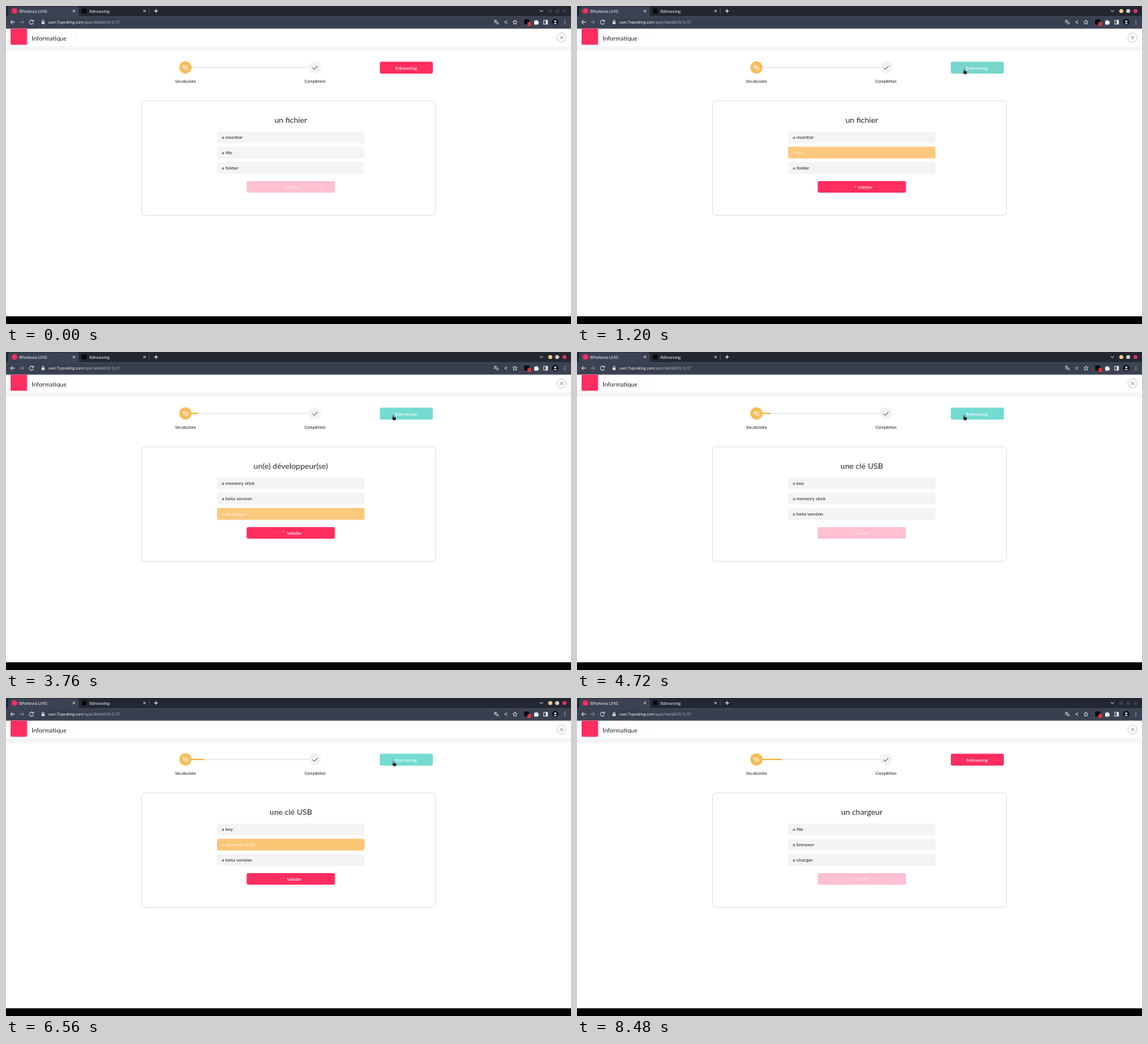
Write an HTML page that moves like this. It is 736 by 414 pixels and loops after 9520 ms.

```html
<!DOCTYPE html>
<html lang="fr">
<head>
<meta charset="utf-8">
<title>Informatique</title>
<style>
  :root { --loop: 9520ms; --pink: #ff2d60; --teal: #74dbd0; --amber: #fbc676; --grey: #f4f4f6; }
  html, body { margin: 0; width: 100%; height: 100%; overflow: hidden; background: #fff; }
  svg { display: block; }
  text { font-family: Lato, sans-serif; font-size: 6.5px; fill: #25252d; }
  .mid { text-anchor: middle; }
  .white { fill: #fff; }
  .ui text { font-size: 5.8px; fill: #e6e9ef; }
  .ui .url { font-size: 5.3px; }
  .line { fill: none; stroke: #dfe3ea; stroke-width: 1; }
  .title { font-size: 10.4px; }
  .step { font-size: 5.4px; }

  /* Window focus, pointer and hover button */
  .dots, .arrow, .hand, .cards { animation: var(--loop) step-end infinite; }
  .dots { animation-name: focus; }
  .arrow { animation-name: arrow; }
  .hand { animation-name: hand; }
  .cards { animation-name: cards; }
  .cursor { animation: move var(--loop) ease-in-out infinite; }
  .hover { fill: var(--pink); animation: hover var(--loop) cubic-bezier(.4, 0, .2, 1) infinite; }
  .bar { fill: #f6bd5b; animation: grow var(--loop) linear infinite; }

  @keyframes focus { 0% { opacity: 0 } 1.7% { opacity: 1 } 87.4%, to { opacity: 0 } }
  @keyframes arrow { 0% { opacity: 1 } 9.4% { opacity: 0 } 81.2%, to { opacity: 1 } }
  @keyframes hand { 0% { opacity: 0 } 9.4% { opacity: 1 } 81.2%, to { opacity: 0 } }
  @keyframes move {
    0%, .6% { transform: translate(742px, 163px); animation-timing-function: ease-in; }
    10.5%, 68.3% { transform: translate(505px, 85px); }
    74.6%, 79% { transform: translate(528px, 85px); }
    88.2%, to { transform: translate(742px, 165px); }
  }
  @keyframes hover {
    0%, 10.6% { fill: var(--pink) }
    13.2%, 81.2% { fill: var(--teal) }
    83.8%, to { fill: var(--pink) }
  }
  @keyframes grow {
    0%, 22.4% { width: 0 }
    23.4%, 49.3% { width: 8.4px }
    50.3%, 76.8% { width: 16.8px }
    77.8%, to { width: 25.2px }
  }
  @keyframes cards {
    0% { transform: none }
    22.48% { transform: translateY(-120px) }
    49.37% { transform: translateY(-240px) }
    76.89%, to { transform: translateY(-360px) }
  }

  /* Answer cycle: every animation below begins at the card's click */
  .play * { animation: var(--loop) step-end var(--at) infinite; }
  .play .box { animation-name: pick; animation-timing-function: cubic-bezier(.4, 0, .2, 1); }
  .play .word { animation-name: word; }
  .play .send { animation-name: send; }
  .play .idle { animation-name: idle; }
  .busy, .done { opacity: 0; }
  .play .busy { animation-name: busy; }
  .play .done { animation-name: done; }
  .spin { fill: none; stroke: #fff; stroke-width: .7; stroke-dasharray: 2 14; }
  .play .spin { animation: spin 1400ms linear infinite; transform-origin: 361px 106px; }
  .box { fill: var(--grey); }
  .send { fill: #ffc0cf; }
  .idle { fill: #ffe8ee; }

  @keyframes pick {
    0% { fill: var(--grey) }
    2.63%, 4.2% { fill: var(--amber) }
    6.83%, 11.9% { fill: var(--teal) }
    12%, to { fill: var(--grey) }
  }
  @keyframes word { 0% { fill: #fff6e4 } 12%, to { fill: #25252d } }
  @keyframes send { 0% { fill: var(--pink) } 12%, to { fill: #ffc0cf } }
  @keyframes idle { 0% { opacity: 0 } 12%, to { opacity: 1 } }
  @keyframes busy { 0% { opacity: 1 } 4.2%, to { opacity: 0 } }
  @keyframes done { 0% { opacity: 0 } 4.2% { opacity: 1 } 12%, to { opacity: 0 } }
  @keyframes spin { to { transform: rotate(360deg) } }
</style>
</head>
<body>
<svg width="736" height="414" viewBox="0 0 736 414">
  <rect width="736" height="414" fill="#fff"/>

  <g class="ui">
    <rect width="736" height="14" fill="#222731"/>
    <path d="M0 13.5Q3 13 3 10V3Q3 .5 6 .5H92Q95 .5 95 3V13.5Z" fill="#3b4252"/>
    <rect y="13" width="736" height="16.5" fill="#3b4252"/>
    <rect x="43" y="16" width="627" height="10.5" rx="5" fill="#373e4c"/>
    <circle cx="11" cy="6.5" r="3.5" fill="#ff2d60"/>
    <text x="17" y="8.6">8Parlovia LMS</text>
    <rect x="99" y="3.5" width="6" height="6" fill="#07090c"/>
    <text x="108.5" y="8.6">8drowsing</text>
    <path class="line" d="M87 5l3 3m0-3l-3 3M179 5l3 3m0-3l-3 3M193 6.5h5m-2.500-2.500v5M695.500 5.500l2 2 2-2"/>
    <path d="M186.500 3v7" stroke="#586070" stroke-width=".7"/>
    <g fill="#363c48"><circle cx="709" cy="6.500" r="2.600"/><circle cx="718" cy="6.500" r="2.600"/><circle cx="727.500" cy="6.500" r="2.600"/></g>
    <g class="dots"><circle cx="709" cy="6.500" r="2.600" fill="#f6d08c"/><circle cx="718" cy="6.500" r="2.600" fill="#d5cdd0"/><circle cx="727.500" cy="6.500" r="2.600" fill="#d8365f"/></g>

    <path class="line" d="M11.500 21H6m2.500-2.500L6 21l2.500 2.500M35.200 19.300A2.700 2.700 0 1 0 35.700 22M35.800 18v2h-2"/>
    <path class="line" d="M17.500 21H23m-2.500-2.500L23 21l-2.500 2.500" opacity=".4"/>
    <path d="M46.300 20.500h4v3h-4z" fill="#dfe3ea"/>
    <path class="line" d="M47.200 20.500v-1a1.100 1.100 0 0 1 2.200 0v1" stroke-width=".6"/>
    <text class="url" x="55" y="23">user.7speaking.com<tspan fill="#aeb5c2">/quiz/kdsi60/0/1/1?</tspan></text>
    <g class="line" style="stroke-width:.8">
      <path d="M635.500 19h4m-2-1v1m1.300 0q-.8 2-3 3m.8-2l2 2m.2 2l1.500-3.500 1.500 3.500"/>
      <path d="M653 19l-3.500 2 3.500 2"/>
      <path d="M663 18.200l.9 1.900 2 .2-1.500 1.400.4 2-1.800-1-1.800 1 .4-2-1.500-1.400 2-.2z"/>
      <rect x="700.500" y="18.700" width="5" height="5"/>
    </g>
    <path d="M703 18.700h2.500v5H703z" fill="#dfe3ea"/>
    <rect x="675" y="17.500" width="6.500" height="6.500" fill="#0a0b0e"/>
    <rect x="679.300" y="21" width="4.700" height="5" rx="1" fill="#e0343d"/>
    <path d="M688 19.200h1.700a1 1 0 0 1 2 0h1.600v1.600a1 1 0 0 1 0 2v1.400H688z" fill="#eef0f4"/>
    <circle cx="715.500" cy="21" r="4.300" fill="#11151c"/>
    <circle cx="715.500" cy="20" r="1.300" fill="#eef0f4"/>
    <path d="M712.900 23.600q2.600-3 5.200 0z" fill="#eef0f4"/>
    <path d="M727.500 18.300h1v1h-1zm0 2.200h1v1h-1zm0 2.200h1v1h-1z" fill="#dfe3ea"/>
  </g>

  <rect x="6" y="29.500" width="21.500" height="21" rx="1" fill="#ff2d60"/>
  <text x="33.500" y="44.600" style="font-size:8px">Informatique</text>
  <path d="M92.500 37v9" stroke="#ececef" stroke-width=".6"/>
  <circle cx="723.700" cy="41" r="6" fill="#fff" stroke="#bdbdc3" stroke-width=".7"/>
  <path d="M721.500 38.800l4.400 4.400m0-4.400l-4.400 4.400" stroke="#777780" stroke-width=".8"/>
  <rect y="52.500" width="736" height="6" fill="#f5f5f7"/>

  <rect x="241" y="79" width="154" height="2" fill="#efeff1"/>
  <rect class="bar" x="241.500" y="79" height="2"/>
  <circle cx="233.800" cy="80" r="8" fill="#f6bd5b"/>
  <path d="M230.500 77.700h2.700v2h-2.700zM234 78.500h3M231 81.200h2m.8-1h3v2.500h-3z" fill="none" stroke="#fff" stroke-width=".7"/>
  <circle cx="402.500" cy="80" r="8" fill="#f2f2f4"/>
  <path d="M399.300 80.300l2.200 2.200 4.300-4.500" fill="none" stroke="#3a3a42" stroke-width=".9"/>
  <text class="mid step" x="233.800" y="100.200">Vocabulaire</text>
  <text class="mid step" x="402.500" y="100.200">Complétion</text>
  <rect class="hover" x="487" y="72.500" width="69" height="15.500" rx="2"/>
  <text class="mid white" x="521" y="82.500" style="font-size:6.200px">8drowsing</text>

  <rect x="176.500" y="123.500" width="383" height="149" rx="4" fill="#fff" stroke="#dfdfe3" stroke-width=".8"/>
  <svg y="130" width="736" height="120"><g class="cards" id="cards"></g></svg>

  <rect y="404" width="736" height="10" fill="#000"/>

  <g class="cursor">
    <path class="arrow" d="M0-3v7.500l1.800-1.600 1.200 2.600 1.200-.6L3 2.400h2.400z" fill="#000" stroke="#fff" stroke-width=".4"/>
    <path class="hand" d="M-1.200-2.500q.7-.8 1.300 0V-.5l2.200.5q1 .3.800 1.400L2.500 3.800h-3.300L-2.400 1.200q-.2-1 1.200-.3z" fill="#000" stroke="#fff" stroke-width=".3"/>
  </g>
</svg>
<script>
  // [title, answers, index of the right one, click time in ms]
  const quiz = [
    ["un fichier", ["a monitor", "a file", "a folder"], 1, 1020],
    ["un(e) développeur(se)", ["a memory stick", "a beta version", "a developer"], 2, 3580],
    ["une clé USB", ["a key", "a memory stick", "a beta version"], 1, 6200],
    ["un chargeur", ["a file", "a browser", "a charger"]]
  ];

  const option = (label, i, right) => {
    const y = 33.5 + i * 19.8;
    const tick = `<path class="done" d="M454.500 ${y + 7.5}l2.300 2.400 4.500-5" fill="none" stroke="#fff" stroke-width="1"/>`;
    return `<rect class="${right ? "box" : ""}" x="275" y="${y}" width="192" height="15.3" rx="2" fill="#f4f4f6"/>
      <text class="${right ? "word" : ""}" x="281" y="${y + 9.8}">${label}</text>${right ? tick : ""}`;
  };

  const card = ([title, answers, right, click], n) => `
    <g transform="translate(0 ${n * 120})" class="${click ? "play" : ""}" style="--at:${(click || 0) - 9520}ms">
      <text class="mid title" x="371" y="21.500">${title}</text>
      ${answers.map((label, i) => option(label, i, i === right)).join("")}
      <rect class="send" x="313.500" y="98" width="115" height="15" rx="2"/>
      <text class="mid idle" x="371" y="108">Valider</text>
      <g class="busy">
        <circle class="spin" cx="361" cy="106" r="2"/>
        <text class="mid white" x="375.500" y="108">Valider</text>
      </g>
      <text class="mid white done" x="371" y="108">Suivant</text>
    </g>`;

  document.getElementById("cards").innerHTML = quiz.map(card).join("");
</script>
</body>
</html>
```
